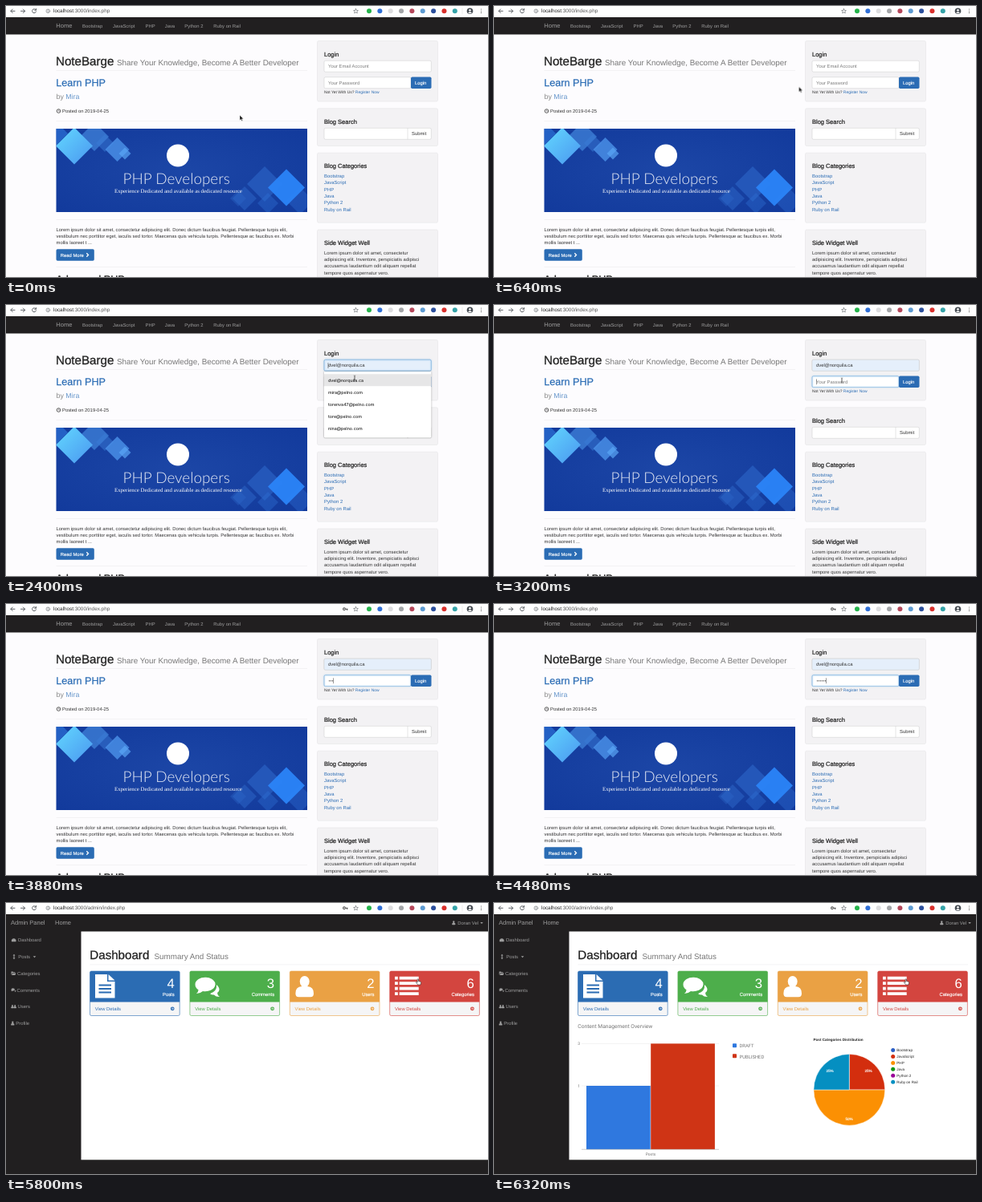
An HTML page for the animation above (6360 ms loop, 600x338 px).

```html
<!DOCTYPE html>
<html lang="en">
<head>
<meta charset="utf-8">
<title>Blog login</title>
<style>
html, body { margin: 0; height: 100%; overflow: hidden; background: #fdfcfe; }
svg { display: block; width: 100vw; height: 100vh; }
text { font: 5.89px "Liberation Sans", Arial, sans-serif; fill: #333; text-rendering: geometricPrecision; white-space: pre; }
.h1 { font-size: 15.14px; }
.h1, .h2, .h4 { fill: #222; stroke: #222; stroke-width: .3; }
.h2 { font-size: 12.6px; }
.h4 { font-size: 7.5px; stroke-width: .22; }
.sub { font-size: 9.85px; fill: #777; }
.lead { font-size: 8.8px; fill: #888; }
.brand { font-size: 7.5px; }
.url { font-size: 6.35px; fill: #555; }
.dim { fill: #9d9d9d; }
.blue { fill: #2b6cb4; stroke: none; }
.h2.blue { stroke: #2b6cb4; stroke-width: .25; }
.lead .blue { fill: #6796cb; }
.hint { fill: #7d7d7d; }
.tiny { font-size: 4.97px; }
.opt { font: 500 5.3px Inter, "DejaVu Sans", sans-serif; fill: #222; }
.mat { font-family: Roboto, Arial, sans-serif; fill: #757575; }
.mat.tiny { font-size: 4.97px; }
.pie { font-size: 4.6px; fill: #222; }
.white { fill: #fff; }
.med { stroke: #fff; stroke-width: .15; }
.b { font-weight: bold; }
.end { text-anchor: end; }
.mid { text-anchor: middle; }
.well { fill: #f3f2f4; stroke: #e1e0e2; stroke-width: .5; }
.field { fill: #fff; stroke: #c8c8ca; stroke-width: .5; }
.glow { fill: none; stroke: #6fb0ea; stroke-width: .6; filter: drop-shadow(0 0 .8px #8cc4f0); }
.rule { stroke: #e9e8ea; stroke-width: .5; }
.line { fill: none; stroke: #5f6368; stroke-width: 1; stroke-linecap: round; stroke-linejoin: round; }
.thin { stroke-width: .6; }
.caret { stroke: #222; stroke-width: .5; }

.t { animation: 6.36s step-end infinite; opacity: 0; }
#blog, #urlBlog { opacity: 1; animation-name: blog; }
#admin, #urlAdmin { animation-name: admin; }
#charts { animation-name: charts; }
#key { animation-name: key; }
#mailHint { opacity: 1; animation-name: mailHint; }
#filled { animation-name: filled; }
#mailGlow { animation-name: mailGlow; }
#mailCaret, #hover { animation-name: preview; }
#list { animation-name: list; }
#passGlow, #passCaret { animation-name: passFocus; }
#passHint { opacity: 1; animation-name: passHint; }
#dots, #dotCover { animation-name: dots; }
#pressed { animation-name: pressed; }
#arrow { animation-name: arrow; }
#beam { animation-name: beam; }
#hand { animation-name: hand; }
#ring { animation-name: ring; }
.type { animation: type 6.36s linear infinite; }
#cursor { animation: move 6.36s ease-in-out infinite; }

@keyframes blog { 0% { opacity: 1 } 88.3% { opacity: 0 } }
@keyframes admin { 0% { opacity: 0 } 88.3% { opacity: 1 } }
@keyframes charts { 0% { opacity: 0 } 91.5% { opacity: 1 } }
@keyframes key { 0% { opacity: 0 } 55% { opacity: 1 } }
@keyframes mailHint { 0% { opacity: 1 } 33% { opacity: 0 } }
@keyframes filled { 0% { opacity: 0 } 33% { opacity: 1 } }
@keyframes mailGlow { 0% { opacity: 0 } 17% { opacity: 1 } 48% { opacity: 0 } }
@keyframes preview { 0% { opacity: 0 } 33% { opacity: 1 } 40.5% { opacity: 0 } }
@keyframes list { 0% { opacity: 0 } 17.5% { opacity: 1 } 40.5% { opacity: 0 } }
@keyframes passFocus { 0% { opacity: 0 } 48% { opacity: 1 } 88.3% { opacity: 0 } }
@keyframes passHint { 0% { opacity: 1 } 55% { opacity: 0 } }
@keyframes dots { 0% { opacity: 0 } 55% { opacity: 1 } }
@keyframes pressed { 0% { opacity: 0 } 80.5% { opacity: 1 } 88.3% { opacity: 0 } }
@keyframes arrow { 0% { opacity: 1 } 13.5% { opacity: 0 } 75.5% { opacity: 1 } 80% { opacity: 0 } }
@keyframes beam { 0% { opacity: 0 } 13.5% { opacity: 1 } 53% { opacity: 0 } }
@keyframes hand { 0% { opacity: 0 } 80% { opacity: 1 } }
@keyframes ring {
  0% { opacity: 0 } 16% { opacity: 1 } 18.5% { opacity: 0 } 39% { opacity: 1 } 41% { opacity: 0 }
  47% { opacity: 1 } 49% { opacity: 0 } 84% { opacity: 1 } 87.5% { opacity: 0 }
}
@keyframes type {
  0% { transform: none }
  52.2% { transform: none; animation-timing-function: steps(8) }
  74.6%, 100% { transform: translateX(16px) }
}
@keyframes move {
  0%, 4% { transform: translate(291px, 139px) }
  15%, 30.5% { transform: translate(441px, 79px) }
  33.5%, 41% { transform: translate(434px, 91px) }
  45%, 75.5% { transform: translate(433px, 94px) }
  82%, 100% { transform: translate(513px, 98px) }
}
</style>
</head>
<body>
<svg viewBox="0 0 600 338" preserveAspectRatio="none">
<defs>
  <radialGradient id="sky" r=".7"><stop stop-color="#1c46a6"/><stop offset="1" stop-color="#123a9c"/></radialGradient>
  <linearGradient id="cyan" x2="1" y2="1"><stop stop-color="#63d9ff"/><stop offset="1" stop-color="#4a97f0"/></linearGradient>
  <clipPath id="bannerBox"><rect x="62.5" y="153" width="312.5" height="104"/></clipPath>
  <clipPath id="passBox"><rect x="396.5" y="89" width="107" height="13"/></clipPath>
  <path id="person" fill="currentColor" d="M-6-6a6 6.7 0 0 1 12 0q0 4-2.5 6.3Q11.5 1 11.3 9q0 4.5-4 4.5H-7.3q-4 0-4-4.5Q-11.5 1-3.5.3-6-2-6-6z"/>
</defs>
<rect width="600" height="338" fill="#fdfcfe"/>

<g id="blog" class="t">
  <rect y="14" width="600" height="21.5" fill="#211f20"/>
  <g id="nav"></g>

  <text class="h1" x="62" y="73.6">NoteBarge</text>
  <text class="sub" x="138" y="73.6">Share Your Knowledge, Become A Better Developer</text>
  <path class="rule" d="M62.5 80.5H375M62.5 143.5H375M62.5 266.5H375M62.5 325.5H375"/>
  <text class="h2 blue" x="62.3" y="100.4">Learn PHP</text>
  <text class="lead" x="62.5" y="116">by <tspan class="blue">Mira</tspan></text>
  <circle cx="65.5" cy="131" r="2.3" fill="none" stroke="#333" stroke-width=".8"/>
  <path d="M65.5 129.6V131.2H66.6" fill="none" stroke="#333" stroke-width=".5"/>
  <text x="70" y="133.2">Posted on 2019-04-25</text>

  <g clip-path="url(#bannerBox)">
    <rect x="62" y="152" width="314" height="106" fill="url(#sky)"/>
    <g id="gems"></g>
    <circle cx="214" cy="186.5" r="14" fill="#fff"/>
    <text x="145.5" y="222" class="white" opacity=".9" style="font:300 18.9px Lato,'Open Sans',sans-serif">PHP Developers</text>
    <text x="135" y="233" class="white" style="font:6.87px 'Liberation Serif',Times,serif">Experience Dedicated and available as dedicated resource</text>
  </g>

  <text x="62.5" y="280.6">Lorem ipsum dolor sit amet, consectetur adipiscing elit. Donec dictum faucibus feugiat. Pellentesque turpis elit,</text>
  <text x="62.5" y="289">vestibulum nec porttitor eget, iaculis sed tortor. Maecenas quis vehicula turpis. Pellentesque ac faucibus ex. Morbi</text>
  <text x="62.5" y="297.3">mollis laoreet t ...</text>
  <rect x="62.5" y="303.3" width="47.3" height="14.4" rx="1.7" fill="#2b6cb4"/>
  <text class="white med" x="67.8" y="312.6">Read More</text>
  <path d="M100.3 308.3l2.2 2.2-2.2 2.2" fill="none" stroke="#fff" stroke-width="1.3"/>
  <text class="h2" x="62.3" y="345">Advanced PHP</text>

  <rect class="well" x="387.5" y="43.5" width="150" height="75.5" rx="1.7"/>
  <text class="h4" x="396" y="62.5">Login</text>
  <rect class="field" x="396" y="68.2" width="133.3" height="14" rx="1.7"/>
  <text id="mailHint" class="t hint" x="401" y="77.3">Your Email Account</text>
  <g id="filled" class="t">
    <rect class="field" x="396" y="68.2" width="133.3" height="14" rx="1.7" style="fill:#e5effb"/>
    <text x="401" y="77.3">dvel@norquila.ca</text>
  </g>
  <rect id="mailGlow" class="t glow" x="396" y="68.2" width="133.3" height="14" rx="1.7"/>
  <path id="mailCaret" class="t caret" d="M401 72V79"/>

  <rect class="field" x="396" y="88.7" width="108" height="14" rx="1.7"/>
  <text id="passHint" class="t hint" x="401" y="97.8">Your Password</text>
  <g clip-path="url(#passBox)">
    <path id="dots" class="t" d="M402.5 95.8h14.1" stroke="#222" stroke-width="1.3" stroke-linecap="round" stroke-dasharray="0 2"/>
    <g id="dotCover" class="t"><rect class="type" x="401.5" y="92" width="22" height="7" fill="#fff"/></g>
  </g>
  <rect id="passGlow" class="t glow" x="396" y="88.7" width="108" height="14" rx="1.7"/>
  <g id="passCaret" class="t"><path class="type caret" d="M401.6 92.3V99.2"/></g>
  <rect x="504" y="88.5" width="25.5" height="14.4" rx="1.7" fill="#2b6cb4"/>
  <rect id="pressed" class="t" x="504" y="88.5" width="25.5" height="14.4" rx="1.7" fill="#1d4078"/>
  <text class="white med" x="509" y="97.8">Login</text>
  <text class="tiny" x="396" y="109">Not Yet With Us? <tspan class="blue">Register Now</tspan></text>

  <rect class="well" x="387.5" y="127.8" width="150" height="46.7" rx="1.7"/>
  <text class="h4" x="396" y="146.7">Blog Search</text>
  <rect class="field" x="396" y="152.3" width="133.3" height="14" rx="1.7"/>
  <path d="M500 152.3V166.3" stroke="#c8c8ca" stroke-width=".5"/>
  <text x="505" y="161.4">Submit</text>

  <rect class="well" x="387.5" y="183.2" width="150" height="87" rx="1.7"/>
  <text class="h4" x="396" y="202.2">Blog Categories</text>
  <g id="cats"></g>

  <rect class="well" x="387.5" y="279" width="150" height="70" rx="1.7"/>
  <text class="h4" x="396" y="298">Side Widget Well</text>
  <text x="396" y="309.6">Lorem ipsum dolor sit amet, consectetur</text>
  <text x="396" y="318">adipisicing elit. Inventore, perspiciatis adipisci</text>
  <text x="396" y="326.3">accusamus laudantium odit aliquam repellat</text>
  <text x="396" y="334.6">tempore quos aspernatur vero.</text>

  <g id="list" class="t">
    <rect x="396" y="83" width="133.3" height="82" rx=".8" fill="#fff" style="filter:drop-shadow(0 .6px 1px #0005)"/>
    <rect id="hover" class="t" x="396" y="86.2" width="133.3" height="15" fill="#e6e6e7"/>
    <g id="opts"></g>
  </g>
</g>

<g id="admin" class="t">
  <rect y="14" width="600" height="324" fill="#211f20"/>
  <rect x="93.5" y="35.5" width="506.5" height="284.8" fill="#fff"/>
  <text class="brand dim" x="6" y="26.8">Admin Panel</text>
  <text class="brand dim" x="61" y="26.8">Home</text>
  <text class="dim end" x="588" y="26.6">Doran Vel</text>
  <path class="dim" d="M590.3 24h3.6l-1.8 1.9zM33.7 66.3h3.6l-1.8 1.9z"/>
  <g id="side"></g>
  <g fill="#9d9d9d" color="#9d9d9d">
    <use href="#person" transform="translate(557.3 24.6) scale(.19)"/>
    <path d="M7 48.2a2.9 2.9 0 1 1 5.4 0z"/>
    <path d="M10 63.7l1.5 1.8h-1v3h1L10 70.3l-1.5-1.8h1v-3h-1z"/>
    <path d="M6.5 85.5h2l.6.8h2.2v.8H8l-1.5 2.6zM8.3 87.5h4.2l-1.1 2.4H7z"/>
    <path d="M6.5 108a2.2 1.7 0 1 1 2 1.6l-1.6.6zM10.5 110q1.5-.4 1.2-1.7 1.5 1 .3 2.2l.3.8z"/>
    <use href="#person" transform="translate(8 129) scale(.16)"/>
    <use href="#person" transform="translate(11.2 129) scale(.16)"/>
    <use href="#person" transform="translate(8.3 150) scale(.19)"/>
  </g>

  <text class="h1" x="104.3" y="70">Dashboard</text>
  <text class="sub" x="184.5" y="70">Summary And Status</text>
  <path class="rule" d="M104.5 76.8H590"/>
  <g id="cards"></g>
  <g fill="#fff" color="#fff">
    <path d="M111 89h15v9h9.5v20.5H111zM127.5 89l8 7.5h-8z"/>
    <path d="M115.5 102.5H131M115.5 107H131M115.5 111.5H131" stroke="#2b6cb3" stroke-width="1.9"/>
    <path d="M254 113q9-3 8-11c5 4 4 8 1 10q0 3 3 5-5 0-7-2.5-3 .3-5-1.5z"/>
    <path d="M235.5 101.5a12.5 8.8 0 1 1 9.5 8.5q-3 2.8-8 3 2.5-2 2.5-4.7-4-2.5-4-6.8z"/>
    <use href="#person" transform="translate(371.7 103.7)"/>
    <path id="bars" d="M484 93.7h3.8m1.9 0h24M484 100.2h3.8m1.9 0h24M484 106.7h3.8m1.9 0h24M484 113.2h3.8m1.9 0h24" stroke="#fff" stroke-width="3.8"/>
  </g>

  <g id="charts" class="t">
    <text class="mat" x="104.3" y="155.5" style="font-size:6.68px">Content Management Overview</text>
    <path d="M109 175.4H280M109 228H280" stroke="#e4e4e4" stroke-width=".5"/>
    <rect x="115" y="228" width="79.7" height="79.2" fill="#2f78df"/>
    <rect x="195.2" y="175.4" width="79.7" height="131.8" fill="#cf3415"/>
    <path d="M109 307.3H280" stroke="#999" stroke-width=".5"/>
    <text class="mat end tiny" x="107" y="177">3</text>
    <text class="mat end tiny" x="107" y="229.7">1</text>
    <text class="mat mid tiny" x="195" y="314.5">Posts</text>
    <rect x="297" y="175.2" width="5" height="5" rx=".8" fill="#2f78df"/>
    <rect x="297" y="188.3" width="5" height="5" rx=".8" fill="#cf3415"/>
    <text class="mat" x="305.5" y="180">DRAFT</text>
    <text class="mat" x="305.5" y="193.5">PUBLISHED</text>

    <text class="pie b" x="397.5" y="172">Post Categories Distribution</text>
    <g stroke="#fff" stroke-width=".5">
      <path d="M442.3 233V188.5A44.4 44.4 0 0 1 486.7 233z" fill="#d32e0e"/>
      <path d="M442.3 233H486.7A44.4 44.4 0 0 1 397.9 233z" fill="#fb9003"/>
      <path d="M442.3 233H397.9A44.4 44.4 0 0 1 442.3 188.5z" fill="#058fc1"/>
    </g>
    <text class="pie white mid med" x="466" y="211">25%</text>
    <text class="pie white mid med" x="418" y="211">25%</text>
    <text class="pie white mid med" x="442" y="271">50%</text>
    <g id="legend"></g>
  </g>
</g>

<rect width="600" height="14" fill="#fefefe"/>
<path class="line" d="M11 6.3H6M8.2 4L5.9 6.3l2.3 2.3"/>
<path class="line" d="M18.5 6.3h5M21.3 4l2.3 2.3-2.3 2.3"/>
<path class="line" d="M37 4.6a2.5 2.5 0 1 0 .5 2.3M37.5 3.5V5.2H35.8"/>
<circle class="line thin" cx="52.3" cy="6.3" r="2.3"/>
<path class="line thin" d="M52.3 6V7.5M52.3 5v.05"/>
<text class="url" x="59" y="8.4"><tspan fill="#222">localhost</tspan>:3000/</text>
<text id="urlBlog" class="t url" x="101.7" y="8.4">index.php</text>
<text id="urlAdmin" class="t url" x="101.7" y="8.4">admin/index.php</text>
<g id="key" class="t" fill="none" stroke="#555" stroke-width="1.1">
  <circle cx="421" cy="6.3" r="1.4"/><path d="M422.4 6.3h3.1M424.6 6.3V8"/>
</g>
<path class="line thin" d="M435.5 3.5l.85 1.9 2.05.2-1.55 1.35.45 2-1.8-1.05-1.8 1.05.45-2-1.55-1.35 2.05-.2z"/>
<g id="icons"></g>
<path d="M568 2.5v8" stroke="#d8d8da" stroke-width=".5"/>
<circle cx="577.5" cy="6.3" r="3.8" fill="#454b52"/>
<circle cx="577.5" cy="5.2" r="1.3" fill="#fff"/>
<path d="M575.2 8.4q2.3-2.4 4.6 0-2.3 1.7-4.6 0z" fill="#fff"/>
<path d="M591.5 4v4.7" stroke="#555" stroke-width="1.1" stroke-linecap="round" stroke-dasharray="0 2.2"/>

<g id="cursor">
  <circle id="ring" class="t" cx=".5" cy="-2" r="13" fill="none" stroke="#1c2450"/>
  <path id="arrow" class="t" d="M0-2.8V3.5l1.5-1.3 1 2.3 1-.45-1-2.2h2z" fill="#111" stroke="#fff" stroke-width=".4"/>
  <path id="beam" class="t" d="M-1.2-3.2q1.2 0 1.2 1V2.2q0 1-1.2 1M1.2-3.2Q0-3.2 0-2.2V2.2q0 1 1.2 1" fill="none" stroke="#333" stroke-width=".45"/>
  <path id="hand" class="t" d="M-.8-3q.7-.8 1.3 0V-.5l2.5.7q.8.3.6 1.3L3 4H-.4L-2.7.8q.6-.8 1.9.4z" fill="#fff" stroke="#111" stroke-width=".5"/>
</g>
</svg>

<script>
const put = (id, items, draw) => document.getElementById(id).innerHTML = items.map(draw).join('');
const text = (x, y, s, cls = '', style = '') => `<text x="${x}" y="${y}" class="${cls}" style="${style}">${s}</text>`;
const cats = ['Bootstrap', 'JavaScript', 'PHP', 'Java', 'Python 2', 'Ruby on Rail'];

const nav = [['Home', 62.3, 'brand'], ...[95, 133, 173.5, 197.7, 222.3, 258.3].map((x, i) => [cats[i], x, ''])];
put('nav', nav, ([s, x, cls]) => text(x, 26.6, s, 'dim ' + cls));
put('cats', cats, (c, i) => text(396, 214 + i * 8.35, c, 'blue'));

const mails = ['dvel@norquila.ca', 'mira@pelno.com', 'torenva47@pelno.com', 'tore@pelno.com', 'nina@pelno.com'];
put('opts', mails, (m, i) => text(401, 95.5 + i * 15.05, m, 'opt'));

// banner diamonds: centre, radius, colour, opacity
const gems = [
  [110, 163, 18, '#4a93e8', .6], [63, 159, 14, '#2f7be0', .6], [85, 174.5, 23, 'url(#cyan)', 1],
  [123, 171, 11, '#3a7cd8', .5], [138.5, 179, 15, '#4b93ea', .8], [148, 184, 7.5, '#5aa5f5', .7],
  [322, 222, 22, '#2a62c4', .7], [297, 240, 15, '#2a62c4', .6], [289, 240, 10, '#2e6acc', .35],
  [366, 243, 17, '#2a66cc', .45], [349, 226.5, 23, '#2b84f8', .95], [326, 246, 13, '#2f6fd2', .4]
];
put('gems', gems, ([x, y, r, fill, o]) =>
  `<path d="M${x} ${y - r}l${r} ${r}-${r} ${r}-${r}-${r}z" fill="${fill}" opacity="${o}"/>`);

const side = [['Dashboard', 15], ['Posts', 15.3], ['Categories', 14], ['Comments', 13.5], ['Users', 14.5], ['Profile', 12.3]];
put('side', side, ([s, x], i) => text(x, 48 + i * 20.85, s, 'dim'));

const cards = [['Posts', 4, '#2b6cb3'], ['Comments', 3, '#4dae4b'], ['Users', 2, '#eaa144'], ['Categories', 6, '#d3453f']];
put('cards', cards, ([name, n, color], i) => {
  const x = 104.5 + i * 124.4, r = x + 111.7;
  return `<rect x="${x}" y="85" width="111.7" height="55.5" rx="1.7" fill="#f5f5f6" stroke="${color}" stroke-width=".6"/>
    <path d="M${x} 123.5v-37q0-1.5 1.5-1.5H${r - 1.5}q1.5 0 1.5 1.5v37z" fill="${color}"/>` +
    text(r - 6.5, 105.5, n, 'white end', 'font-size:16.7px') +
    text(r - 6.5, 115.5, name, 'white end med') +
    text(x + 6.3, 134, 'View Details', '', `fill:${color}`) +
    `<circle cx="${r - 9}" cy="131.8" r="2.4" fill="${color}"/>
    <path d="M${r - 10.5} 131.8h2.6m-1.2-1.3l1.3 1.3-1.3 1.3" fill="none" stroke="#fff" stroke-width=".6"/>`;
});

const hues = ['#2b5fc6', '#d32e0e', '#fb9003', '#109618', '#990099', '#058fc1'];
put('legend', cats, (c, i) => {
  const y = 183.5 + i * 7.95;
  return `<circle cx="496.7" cy="${y}" r="2.5" fill="${hues[i]}"/>` + text(501.3, y + 1.7, c, 'pie');
});

const icons = ['#25b34b', '#2f6fd6', '#dcdcde', '#a3a5a8', '#b5475a', '#5d9bd2', '#2b4f9c', '#d9302c', '#35a3a8'];
put('icons', icons, (c, i) => `<circle cx="${452 + i * 13.35}" cy="6.3" r="3" fill="${c}"/>`);
</script>
</body>
</html>
```
